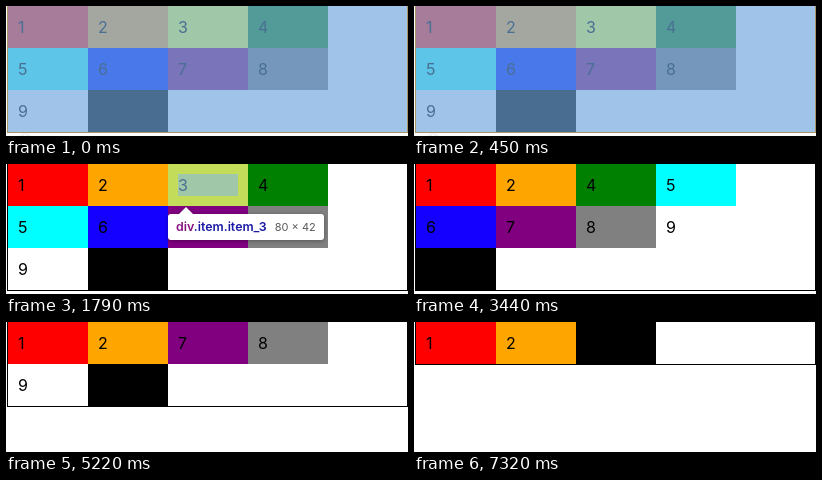
Animation, 402 px wide and 130 px high, one loop 8000 ms. Source, as an HTML page:

```html
<!DOCTYPE html>
<html lang="en">
<head>
<meta charset="utf-8">
<title>Removing grid items</title>
<style>
html, body { margin: 0; width: 100%; height: 100%; overflow: hidden; background: #fff; }
#stage { position: relative; width: 402px; height: 130px; overflow: hidden; font-family: Inter, Roboto, sans-serif; }
#box {
  position: absolute; left: 1px; top: 0; width: 401px; box-sizing: border-box;
  display: flex; flex-wrap: wrap; border: 1px solid #000; border-top: 0; background: #fff;
}
.item { box-sizing: border-box; width: 80px; height: 42px; padding: 10px; font-size: 16px; line-height: 22px; color: #000; }
#tip {
  position: absolute; height: 26px; padding: 0 8px; border-radius: 3px; background: #fff;
  display: flex; gap: 8px; align-items: baseline; white-space: nowrap; line-height: 26px;
  filter: drop-shadow(0 1px 2px rgba(0, 0, 0, .35));
}
#tip::before {
  content: ""; position: absolute; left: 10px; top: -7px; width: 16px; height: 8px;
  background: #fff; clip-path: polygon(50% 0, 100% 100%, 0 100%);
}
#tip b { font-size: 12.4px; font-weight: 600; color: #1a1aa6; }
#tip i { font-style: normal; color: #881280; }
#size { font-size: 11px; color: #5a5a5a; }
</style>
</head>
<body>
<div id="stage">
  <div id="box"></div>
  <div id="tip"><b><i>div</i><span id="cls"></span></b><span id="size"></span></div>
</div>
<script>
const LOOP = 8000;
const INK = '#4a6f94';

// plain colour, colour under the inspector tint
const COLORS = [
  ['#f00', '#a67c9a'], ['#ffa500', '#a4a79f'], ['#ff0', '#a0c8a8'],
  ['#008000', '#529b98'], ['#0ff', '#5cc5e8'], ['#1400ff', '#4878ea'],
  ['#800080', '#7a74ba'], ['#808080', '#7497bb'], ['#fff', '#9fc3e9'],
  ['#000', '#496d91']
];
const PADDING = { 1: '#c37650', 3: '#c3dd5a' };

// start time, items removed after item 2, inspected element
const STEPS = [
  [0, 0, 'all'], [150, 0, 0], [450, 0, 'all'], [1040, 0, 0], [1490, 0, 1], [1790, 0, 3],
  [3440, 1, 0], [3880, 2, 0], [4480, 3, 0], [5220, 4, 0], [5820, 5, 0], [6420, 6, 0], [7320, 7, 0]
];

const get = id => document.getElementById(id);
const box = get('box'), tip = get('tip'), cls = get('cls'), size = get('size');

const items = COLORS.map((_, i) => {
  const el = document.createElement('div');
  el.className = 'item';
  el.textContent = i < 9 ? i + 1 : '';
  return box.appendChild(el);
});

function fill(n, target) {
  const [plain, tint] = COLORS[n - 1];
  if (target === 'all') return tint;
  if (target !== n) return plain;
  return `linear-gradient(${tint}, ${tint}) content-box, ${PADDING[n]}`;
}

function showTip(target) {
  tip.style.display = target ? 'flex' : 'none';
  if (!target) return;
  const all = target === 'all';
  cls.textContent = all ? '.container' : '.item.item_' + target;
  size.textContent = all ? '401 × 128' : '80 × 42';
  tip.style.left = (all ? 1 : 2 + (target - 1) * 80) + 'px';
  tip.style.top = (all ? 135 : 50) + 'px';
}

function show([, removed, target]) {
  const all = target === 'all';
  items.forEach((el, i) => {
    const n = i + 1;
    el.style.display = n > 2 && n <= 2 + removed ? 'none' : 'block';
    el.style.background = fill(n, target);
    el.style.color = all || target === n ? INK : '#000';
  });
  box.style.background = all ? COLORS[8][1] : '#fff';
  box.style.borderColor = all ? '#a89765' : '#000';
  showTip(target);
}

const start = performance.now();
let current;
function tick() {
  const t = (performance.now() - start) % LOOP;
  const step = STEPS.findLast(s => s[0] <= t) || STEPS[0];
  if (step !== current) show(current = step);
  requestAnimationFrame(tick);
}
tick();
</script>
</body>
</html>
```
